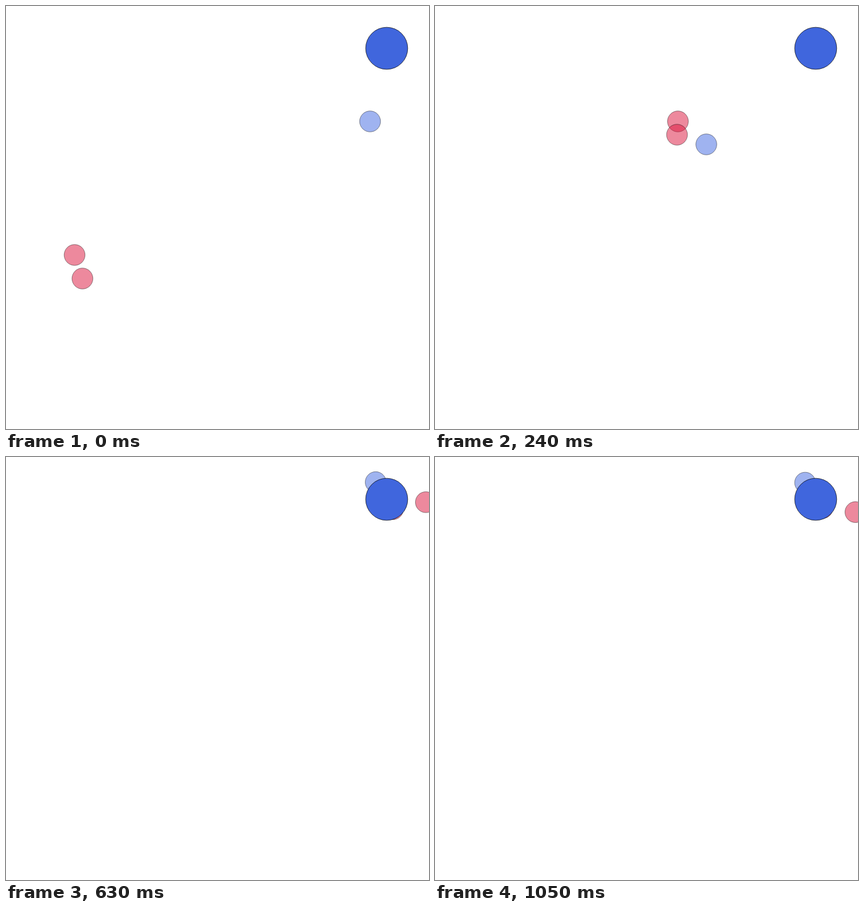
Animation of 700 by 700 pixels, one loop 1080 ms. Source, as an HTML page:

```html
<!DOCTYPE html>
<html lang="en">
<head>
<meta charset="utf-8">
<title>Circles</title>
<style>
  html, body { margin: 0; width: 100%; height: 100%; overflow: hidden; background: #fff; }
  svg { display: block; width: 100%; height: 100%; }
  circle { stroke: #000; stroke-width: .7; }
  .agent { r: 17.3px; fill-opacity: .5; stroke-opacity: .6; }
  .red { fill: crimson; }
  .blue { fill: royalblue; }
  .goal { fill: #4066dd; }
</style>
</head>
<body>
<svg viewBox="0 0 700 700">
  <circle id="leader" class="agent red"/>
  <circle id="follower" class="agent red"/>
  <circle id="runner" class="agent blue"/>
  <circle class="goal" cx="630" cy="70" r="34.8"/>
</svg>
<script>
const STEP_MS = 30;
const STEPS = 36;
const BEATS = [0, 3, 8, 13, 17];
const ARRIVAL = BEATS.at(-1);

const sway = n => Math.sin(0.19 * n);
const settle = n => 1 - 0.5 ** n;

// Each agent runs through one point per beat, then drifts around its last point.
const agents = [
  { id: "leader", x: [113.5, 218.5, 402, 601, 695.5], y: [412, 325, 191, 89, 86.5],
    drift: [-1, -17], ease: sway },
  { id: "follower", x: [126.5, 221.5, 400.5, 593.5, 641], y: [451, 353, 213, 93, 85],
    drift: [-1, 2], ease: sway },
  { id: "runner", x: [602.5, 531.5, 449, 552.5, 601], y: [191, 268, 229, 142.5, 29],
    drift: [11.5, 13.5], ease: settle }
];

const slope = (values, i) => (values[i + 1] - values[i]) / (BEATS[i + 1] - BEATS[i]);

// Slope at a beat, weighted towards the shorter neighbouring span
function tangent(values, i) {
  if (i === 0) return slope(values, 0);
  if (i === BEATS.length - 1) return slope(values, i - 1);
  const before = BEATS[i] - BEATS[i - 1], after = BEATS[i + 1] - BEATS[i];
  return (slope(values, i - 1) * after + slope(values, i) * before) / (before + after);
}

// Cubic Hermite curve through the beats
function approach(values, step) {
  const i = BEATS.findLastIndex((beat, k) => k < BEATS.length - 1 && beat <= step);
  const span = BEATS[i + 1] - BEATS[i];
  const u = (step - BEATS[i]) / span, v = 1 - u;
  return values[i] * (1 + 2 * u) * v * v + values[i + 1] * (1 + 2 * v) * u * u
    + span * u * v * (tangent(values, i) * v - tangent(values, i + 1) * u);
}

function position(values, drift, ease, step) {
  const run = approach(values, Math.min(step, ARRIVAL));
  return run + drift * ease(Math.max(0, step - ARRIVAL));
}

function render(ms) {
  const step = Math.floor(ms / STEP_MS) % STEPS;
  for (const { id, x, y, drift, ease } of agents) {
    const circle = document.getElementById(id);
    circle.setAttribute("cx", position(x, drift[0], ease, step));
    circle.setAttribute("cy", position(y, drift[1], ease, step));
  }
}

const start = performance.now();
function tick() {
  render(performance.now() - start);
  requestAnimationFrame(tick);
}
tick();
</script>
</body>
</html>
```
